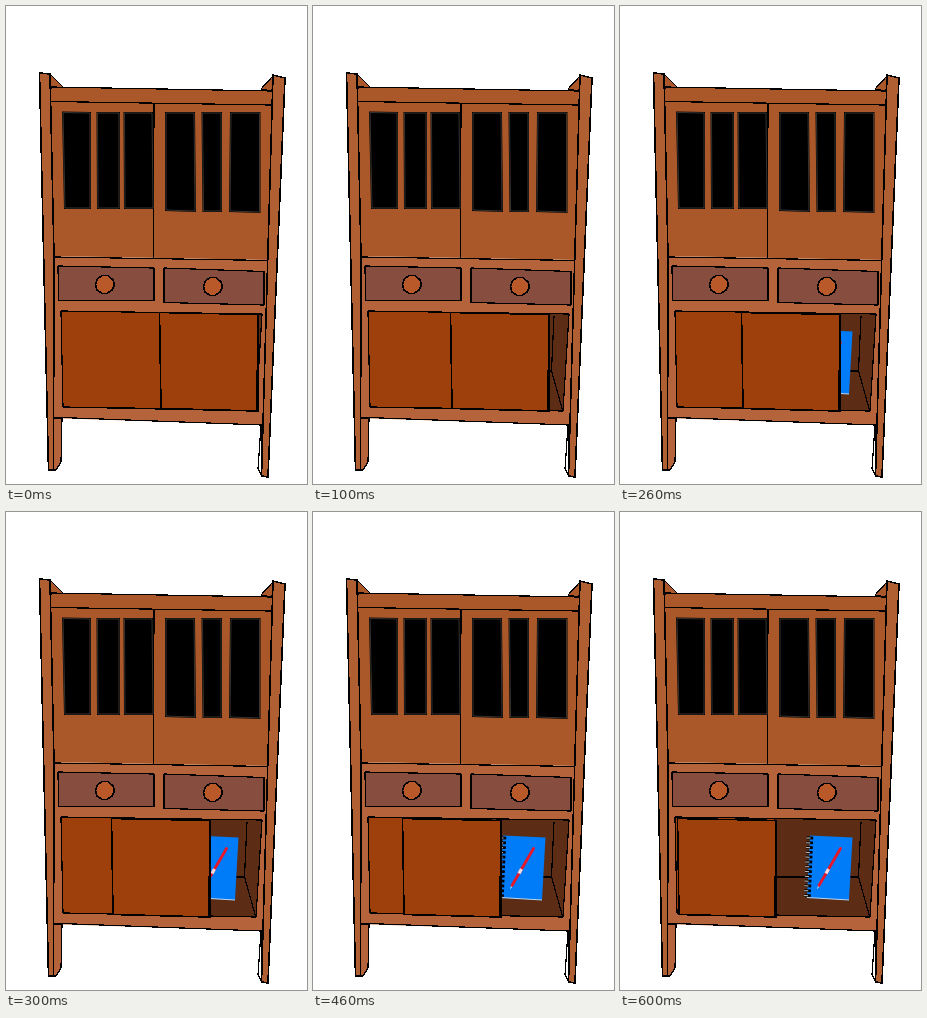
These frames come from a looping animation (301x478 px, 700 ms). An HTML page:

```html
<!DOCTYPE html>
<html lang="en">
<head>
<meta charset="utf-8">
<title>Cabinet</title>
<style>
  html, body { margin: 0; width: 100%; height: 100%; overflow: hidden; background: #fff; }
  svg { display: block; width: 301px; height: 478px; }
  .ink { stroke: #000; stroke-width: 1.2; stroke-linejoin: round; stroke-linecap: round; shape-rendering: crispEdges; }
  .line { fill: none; }
  .upper { fill: #aa5829; }
  .lower { fill: #b4633a; }
  .post { fill: #b05f33; }
  .drawer { fill: #874e40; }
  .panel { fill: #9e400c; }
  .inside { fill: #5c2c14; }
  .knob { fill: #b9592a; stroke-width: 1.7; }
  .bold { stroke-width: 1.6; }
  .edge { stroke-width: 2.4; }
  /* Seven equal positions, 16px apart */
  .slider { animation: slide 700ms steps(7, end) infinite; }
  @keyframes slide { to { transform: translateX(-112px); } }
</style>
</head>
<body>
<svg viewBox="0 0 301 478">
  <!-- carcass -->
  <path class="upper" d="M44 81 266 85 264 254 46 250Z"/>
  <path class="lower" d="M46 250 264 254 258 419 46 412Z"/>
  <path class="ink upper" d="M44 68 57 81 45 82ZM267 70 255 83 266 85Z"/>
  <path class="ink line" d="M45 81 266 85M45 95.500 265 99M148 98 147.500 251M48 251 264 254.500"/>

  <!-- legs and posts -->
  <path class="ink lower" d="M47 412H56L55 456 50 464H47Z"/>
  <path class="ink" fill="#fff" d="M255 419 252 463 256 470Z"/>
  <path class="ink post bold" d="M33.500 67 44 68 48 250 47.500 464H42.500Z"/>
  <path class="ink post bold" d="M267 69 279 72 262 471 255.500 470Z"/>
  <path class="ink line" d="M55 411.500 256 419"/>

  <!-- windows: black panes with a faint inner outline -->
  <defs>
    <g id="panes">
      <path d="M57 106.500 84 107V202H59Z"/>
      <path d="M91.500 107H113V202H92Z"/>
      <path d="M118.500 107H146L147 202H119Z"/>
      <path d="M160 107H188L189 205 160 204Z"/>
      <path d="M196.500 107H215V205H197.500Z"/>
      <path d="M225 107H253.500V206L224 205Z"/>
    </g>
  </defs>
  <use href="#panes" stroke="#000" stroke-width="2"/>
  <use href="#panes" fill="none" stroke="#5f5750" stroke-width=".6"/>

  <!-- drawers -->
  <g class="ink drawer">
    <path d="M52 260 148 262V294.500L52.500 294.500Z"/>
    <path d="M158 262 258 265.500V299L158 296.500Z"/>
  </g>
  <path id="knob" class="ink knob" d="M96 269.500H102L107 274 108.500 279 106 284 101 287.500H96L91 284 89.500 278 91.500 273Z"/>
  <use href="#knob" x="108" y="2"/>

  <!-- compartment -->
  <path class="ink inside" d="M55 305 256 308 250 405 57 401Z"/>
  <path class="ink line" d="M241 310 238.500 365 249.500 404M157 365H238.500"/>

  <!-- notebook with ring binding -->
  <path fill="#007cf8" d="M190 323.500 232.500 325.500 229 388 187 385.500Z"/>
  <g fill="none">
    <path stroke="#b9d9f5" d="M187 385.500 229 388"/>
    <path stroke="#000" stroke-width="6.500" stroke-dasharray="2.800 2" d="M190 324.500 187.500 385"/>
    <path stroke="#ccc" stroke-width="4" stroke-dasharray="1 3.800" d="M188.500 325.500 186 385"/>
    <!-- pen -->
    <path stroke="#e8182c" stroke-width="2.800" stroke-linecap="round" d="M220.500 336.500 199 373.500"/>
    <path stroke="#f3d9dc" stroke-width="3.200" d="M208.500 357 206 361.500"/>
    <path stroke="#eee" d="M198.500 374.500 197.500 376.500"/>
  </g>

  <!-- doors -->
  <path class="ink panel" d="M55 305 154.500 306.500 155 402.500 57 401Z"/>
  <g class="slider">
    <path class="ink panel bold" d="M153.500 306.500 252 308.500V405L155 402.500Z"/>
    <path class="ink line edge" d="M252 309 251.500 405"/>
  </g>
</svg>
</body>
</html>
```
